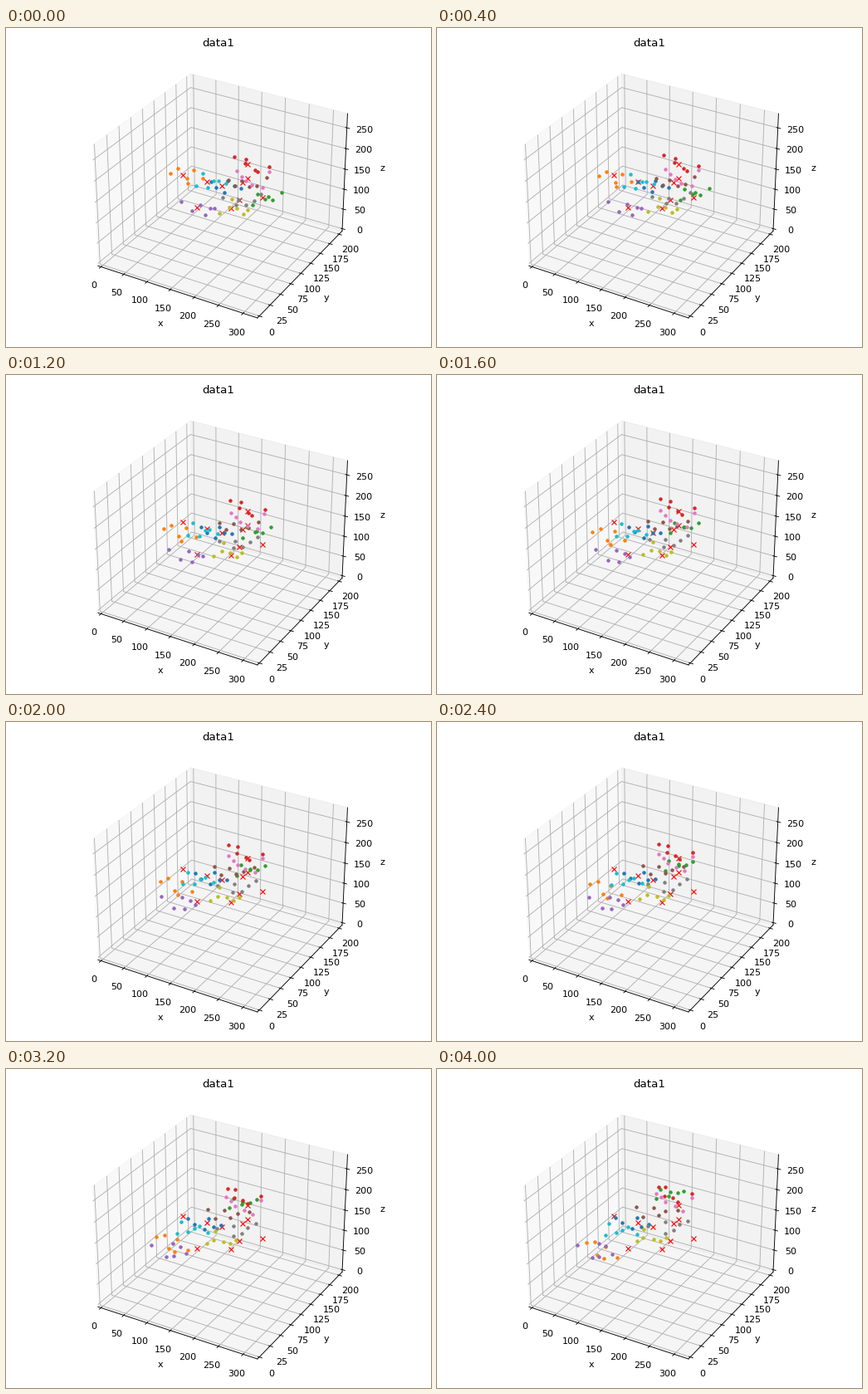
A matplotlib script for the animation above (4.4 s loop, 512 by 384 pixels).

```python
import numpy as np
import matplotlib.pyplot as plt
from matplotlib.animation import FuncAnimation

WIDTH, HEIGHT, DPI = 512, 384, 80
FRAMES, INTERVAL = 11, 400
BOX, BOX_LEFT, BOX_BOTTOM = 342, 85.0, 13.4    # square 3D axes, in pixels
DOTS = 6                                       # dots per swarm

plt.rcParams["font.family"] = "DejaVu Sans"
fig = plt.figure(figsize=(WIDTH / DPI, HEIGHT / DPI), dpi=DPI, facecolor="white")


def padded(top):
    return -top / 48, top * 49 / 48


space = fig.add_axes([BOX_LEFT / WIDTH, BOX_BOTTOM / HEIGHT,
                      BOX / WIDTH, BOX / HEIGHT], projection="3d")
space.view_init(elev=30, azim=-60)
space.set(xlim=padded(322), ylim=padded(204.5), zlim=padded(278),
          xlabel="x", ylabel="y", zlabel="z",
          xticks=range(0, 301, 50), yticks=range(0, 201, 25),
          zticks=range(0, 251, 50))
fig.text(0.5, 1 - 22.5 / HEIGHT, "data1", size=12, ha="center", va="baseline")

# Overlay in screen coordinates, y pointing down
screen = fig.add_axes([0, 0, 1, 1], xlim=(0, WIDTH), ylim=(HEIGHT, 0))
screen.axis("off")

# Fixed cross of each swarm and the point its dots drift to
homes = np.array([(259, 189), (212, 176), (308, 203), (290, 163), (229, 215),
                  (284, 185), (290, 180), (280, 206), (270, 216), (241, 184)])
goals = np.array([(235, 185), (197, 219), (279, 152), (283, 150), (190, 219),
                  (264, 169), (283, 158), (280, 185), (258, 202), (220, 195)])
starts = homes + (5, 1)
screen.plot(*(homes.T + 0.5), "x", color="red", markersize=6)

rng = np.random.default_rng(3)
swarms = []
for i, (start, goal) in enumerate(zip(starts, goals)):
    offsets = np.column_stack([np.linspace(-18, 18, DOTS) + rng.normal(0, 3, DOTS),
                               rng.uniform(-11, 11, DOTS)])
    offsets -= offsets.mean(axis=0)
    wander = rng.normal(0, 3, (DOTS, 2))
    dots, = screen.plot([], [], ".", color=f"C{i}", markersize=6)
    swarms.append((dots, start + offsets, goal - start + wander))


def draw(frame):
    s = frame / (FRAMES - 1)
    bow = 4 * s * (1 - s) * np.array([-3, 0])
    for dots, origin, drift in swarms:
        dots.set_data(*(origin + drift * s + bow + 0.5).T)
    return [swarm[0] for swarm in swarms]


anim = FuncAnimation(fig, draw, frames=FRAMES, interval=INTERVAL,
                     repeat=True, repeat_delay=0, blit=False)
plt.show()
```
